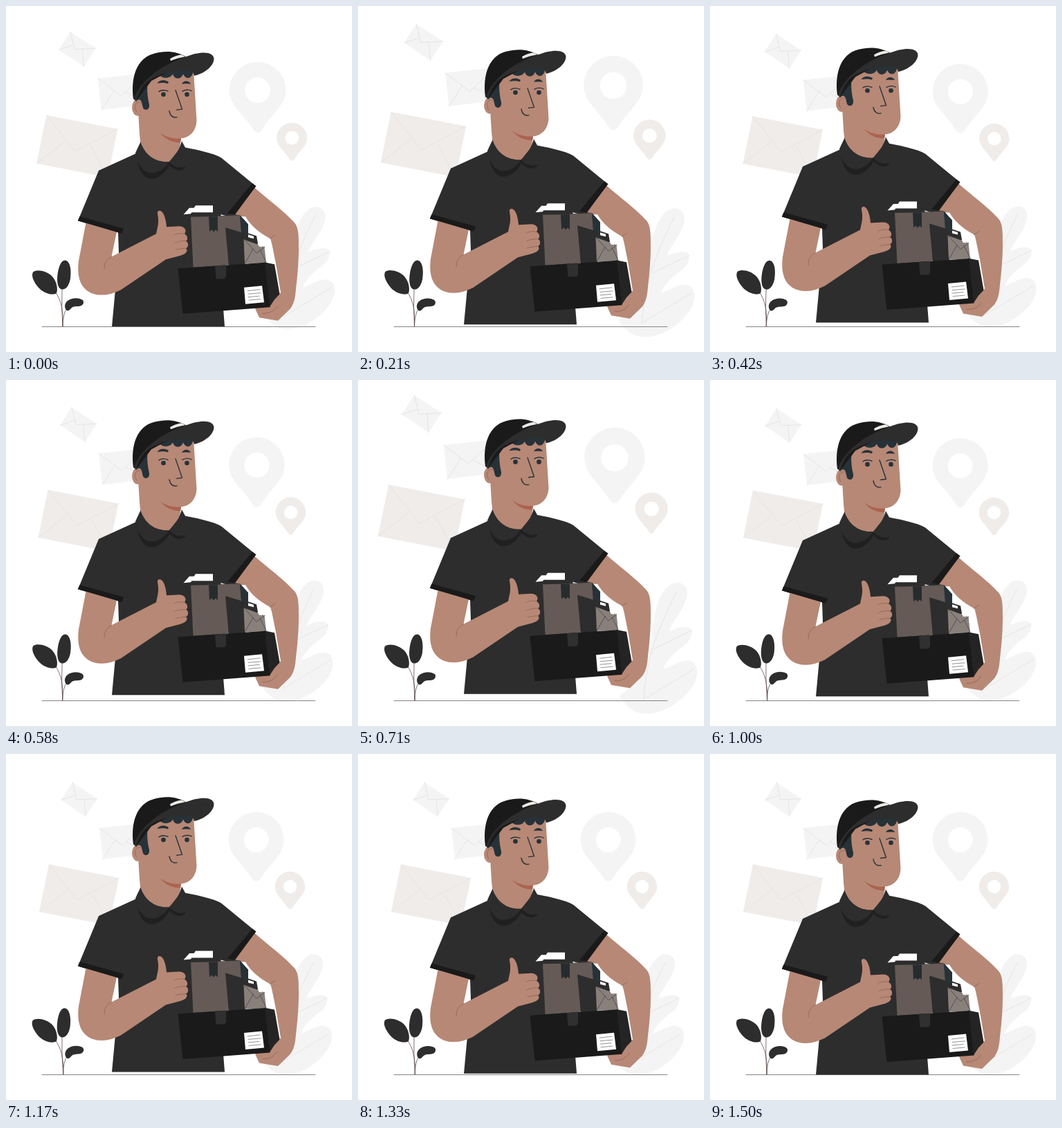
Animation, 500 px wide and 500 px high, one loop 1540 ms. Source, as an HTML page:

```html
<!DOCTYPE html>
<html lang="en">
<head>
<meta charset="utf-8">
<title>Courier</title>
<style>
html, body { margin: 0; height: 100%; overflow: hidden; background: #fff; }
svg { display: block; width: 100vw; height: 100vh; }
.line { fill: none; stroke-width: .8; stroke-linecap: round; stroke-linejoin: round; }
.bold { stroke-width: 1.4; }
.skin { fill: #b78876; }
.cloth { fill: #2d2d2d; }
.ink { fill: #1a1a1a; }
.hair { fill: #263238; }
.brown { fill: #655a56; }
.pale { fill: #f4f4f4; }
.warm { fill: #efecea; }
.white { fill: #fff; }
.fold { stroke: #e4e1e0; }
.crease { stroke: #8f6252; }
.dark { stroke: #263238; }
</style>
</head>
<body>
<svg viewBox="0 0 500 500">
  <defs>
    <path id="pin" fill-rule="evenodd" d="M0-40C22-40 40-22 40 0C40 22 20 33 5.500 57Q0 63.500-5.500 57C-20 33-40 22-40 0C-40-22-22-40 0-40ZM0-18A18 18 0 1 0 0 18A18 18 0 1 0 0-18Z"/>
  </defs>

  <g id="back">
    <path class="pale" d="M402 463C388 463 376 452 368 440L392 420C405 405 410 380 412 350C415 315 428 290 444 289.500C456 289 461 301 456 313C450 330 437 342 434 354C442 350 452 347 460 349C467 352 465 362 457 370C446 379 432 388 426 404C437 401 449 391 461 393C473 396 474 412 466 425C455 445 425 465 402 463Z"/>
    <path class="line fold" d="M400 446Q402 412 411 379Q424 340 444 301M414 377L464 353M402 443L467 404"/>
    <path class="pale" d="M96 41L132 64.500L115 90.500L79.500 66.500Z"/>
    <path class="line fold" d="M96 41L102 66L132 64.500M79.500 66.500L100 60M115 90.500L113 66"/>
    <path class="pale" d="M135 107L202 100L207 144L140 152Z"/>
    <path class="line fold" d="M135 107L168 132L202 100M140 152L158 124M174 127L207 144"/>
    <path class="warm" d="M62 159.500L163 179L149 247.500L48 228Z"/>
    <path class="line fold" d="M62 159.500L103 211L163 179M48 228L88 197M125 203L149 247.500"/>
    <use href="#pin" class="pale" x="361.700" y="124"/>
    <use href="#pin" class="warm" transform="translate(410.500 191.700) scale(.54)"/>
  </g>

  <path class="line" stroke="#666" d="M52 463.500H447"/>

  <g id="plant">
    <path class="line" stroke="#5c4d4a" d="M82 463C83 440 80 425 71 413M82 463Q80 435 81 408M82 463Q82 445 88 437"/>
    <path class="cloth" d="M39 384.500C45 380 59 383 67 391C74 399 75 410 73 415C67 419 54 415 47 407C40 399 36 390 39 384.500Z"/>
    <path class="cloth" d="M85 367.500C92 367.500 95 380 93 394C91 405 86 410 81 409.500C75 409 73 399 74.500 388C76 376 80 367.500 85 367.500Z"/>
    <path class="cloth" d="M88 440C84 437 84 430 89 426C95 421 106 421 111 425C113 428 112 431 109 433C104 435 99 433 95 436C92 439 91 441 88 440Z"/>
  </g>

  <g id="man">
    <!-- far arm and torso -->
    <path class="skin" d="M359 262C378 279 402 296 417 313C423 320 423 332 423 350C423 370 421 392 419 408C418 422 416 430 411 437L393 454.500L366 450L360 437L390 420L397 414L390 372C386 352 384 341 382 336Q357 323 346 304H327Z"/>
    <path class="line crease" d="M381 336L389 331M371 444C380 445 388 440 392 434"/>
    <path class="cloth" d="M192 211L134 237.500L104 310L162 327L163 356L153 463H316L314 437L318 301L329 304L361 260L311 219C302 213 275 207 257 204Z"/>
    <path class="ink" d="M106.500 304L104 310L167 328.500L170 321.500ZM356 256L361.500 260L328 304L316 304Z"/>

    <!-- head -->
    <path class="skin" d="M205 103L190 135L193 185L195 205C203 222 220 230 235 226L251 206L253 191C266 190 275 180 275.500 165L271 92H215Z"/>
    <path fill="#ab6350" d="M223 183C232 190 243 192 253 191L252 197C240 197 230 192 223 183Z"/>
    <ellipse class="skin" cx="190.500" cy="146.500" rx="8.500" ry="12"/>
    <path class="line crease" d="M194 139C187 136 184 147 189 153"/>
    <path class="hair" d="M188 138C186 125 194 108 206 102C203 115 204 130 207 142C208 150 201 152 198 147L196 139C195 134 190 134 188 138Z"/>
    <path class="hair" d="M216 92L221 98C224 105 237 106 241 98C243 106 253 107 256 98C259 106 268 106 270 96V90Z"/>
    <path class="ink" d="M184 134C180 102 189 75 214 68.500C232 63.500 248 66 260 73L262 80L210 108L188 137Z"/>
    <path class="cloth" d="M185 133C195 108 222 86 258 74C282 64 300 66 300.500 76C300 88 285 98 272 100.500C271 97 270 95 268 94C248 91 224 96 207 107C196 115 191 126 188 138Z"/>
    <path fill="#ece8e3" d="M237 76Q245 71 254 70L259 73Q247 75 238 79Z"/>
    <g class="hair">
      <circle cx="227.500" cy="127.700" r="3.300"/>
      <circle cx="261.500" cy="127.700" r="3.300"/>
      <path d="M218.500 111.500C222 106 230 106 235 109.500L234 112C228 110 224 111 218.500 111.500ZM254 112.500C257 107 264 107 267 112.500C262 112 258 112 254 112.500Z"/>
    </g>
    <path class="line bold dark" d="M221 123.500C224 121 230 121 234 123M255 123C258 121 264 120 268 122.500M245 121.500L254.500 149L246.500 150M236 151.500C237 158 241 162 247 160.500"/>

    <!-- collar -->
    <path fill="#202020" d="M189 208C188 232 197 249 210 249.500C222 249 231 240 236 230C244 238 252 240 259 234V228L236 225C214 226 200 215 194 200Z"/>
    <path class="cloth" d="M194.500 196L187 212C190 231 200 242 212 241C222 240 230 234 235.500 225C215 226 200 214 194.500 196ZM254 195L260 206L261 231C252 236 243 232 235.500 225C245 217 251 206 254 195Z"/>

    <!-- parcels -->
    <path class="cloth" d="M264 298H310L338 302L350 315V328L362 332L364 343L345 373H322L270 320Z"/>
    <path class="white" d="M256.500 301L265 291.500H272.500L267 300ZM274 288H299V298H267ZM310 301L318 303H311ZM350 330L358 332.500V336L350 334Z"/>
    <path class="brown" d="M267 304.500L318 303.500L322 374L270.500 377.500Z"/>
    <path class="brown" d="M306 303.500L338 302L340 327L317 320Z"/>
    <path class="cloth" d="M317 320L340 327L346 373L322 375Z"/>
    <path class="hair" d="M338 302L350 316V331L340 327Z"/>
    <path fill="#282b2e" d="M293 304H306V326L303 323L300 326L297 323L294 326Z"/>
    <path fill="#89807c" d="M343.500 337L373.500 348L376 371L345 372Z"/>
    <path class="line" stroke="#4a4543" d="M344 337L362 357L374 348M345.500 371L357 351M376 370L367 352"/>
    <path class="white" d="M365 343.500L370.500 346L369.500 348L365 347Z"/>
    <path fill="#242424" d="M373 370L388 373L395.500 416L388 424L381 434.500Z"/>
    <path class="ink" d="M248.500 379L374 370.500L381.500 435L255.500 444.500Z"/>
    <path fill="#303030" d="M302 375.300L318 374.200L318 390L316 394H303.500Z"/>
    <path class="white" d="M344 406.500L370 404L373 428L346 430.500Z"/>
    <path class="line" stroke="#777" d="M349 411.500L367 409.500M350 416L368 414.500M350 420.500L366 419M351 425L368 423.500"/>

    <!-- thumb-up arm -->
    <path class="skin" d="M115.500 313L105 368C102 392 108 408 124 415C138 420 152 417 166 410L231 366L250 361C260 359 264 353 260 350C264.500 348 264 341 260 339.500C264 337 262 331 258 329C262 324 258 318 250 318L232 319C231 308 229 302 226 298C223 294 218 295 219 300C221 310 220 316 218 324L217 329L152.500 362L160 326Z"/>
    <path class="line crease" d="M152.500 362C145 366 142 371 142 380M243 330.500C249 328 254 328 258 329M244 342C250 339.500 256 339 260 339.500M245 352C251 351 256 350 260 350"/>
    <path class="ink" d="M106.500 304L104 310L167 328.500L170 321.500Z"/>
  </g>
</svg>
<script>
const LOOP = 1540, STEPS = 37, CYCLE = 1500, LEAD = 27;
const back = document.getElementById("back");
const plant = document.getElementById("plant");
const man = document.getElementById("man");

// [percent of cycle, value]
const beat = [[0, 1], [10, 1.1], [30, 1], [40, 1], [50, 1.1], [60, 1], [100, 1]];
const wind = [[0, 0], [25, 1], [75, -1], [100, 0]];
const lift = [[0, 0], [50, -10], [100, 0]];

function at(keys, p) {
  const i = Math.max(1, keys.findIndex(k => k[0] >= p));
  const [a, u] = keys[i - 1], [b, v] = keys[i];
  return u + (v - u) * (p - a) / (b - a);
}

function draw(time) {
  // 24 poses per second
  const step = Math.min(STEPS - 1, Math.floor((time % LOOP + 4) / (LOOP / STEPS)));
  const p = Math.min(100, (step * CYCLE / (STEPS - 1) + LEAD) / CYCLE * 100);
  back.setAttribute("transform", `translate(259.5 252) scale(${at(beat, p)}) translate(-259.5 -252)`);
  plant.setAttribute("transform", `rotate(${at(wind, p)} 75 415)`);
  man.setAttribute("transform", `translate(0 ${at(lift, p) + .5})`);
}

let start;
function tick(now) {
  start ??= now;
  draw(now - start);
  requestAnimationFrame(tick);
}
draw(0);
requestAnimationFrame(tick);
</script>
</body>
</html>
```
